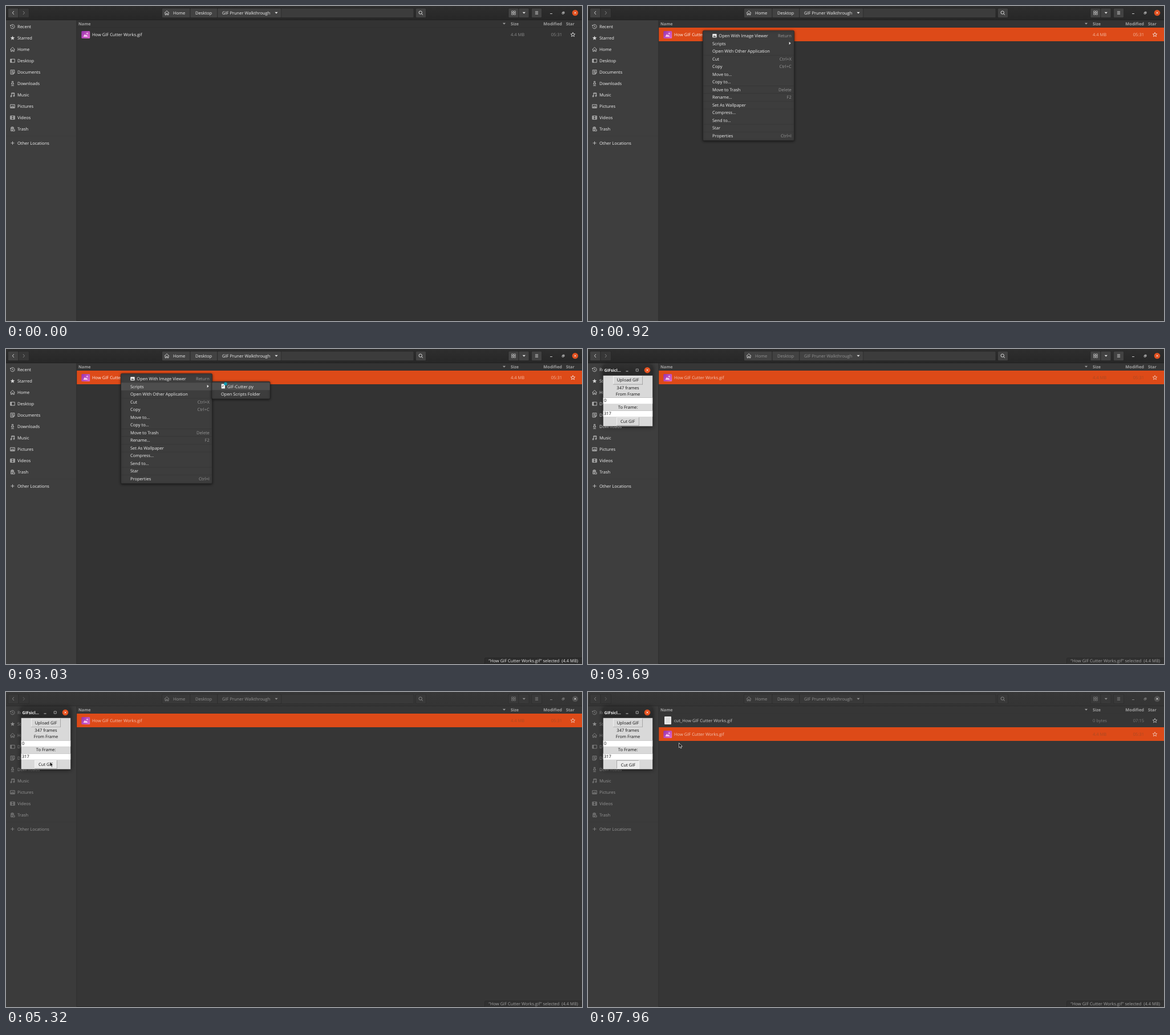
Recreate the animation shown at these times as an HTML page with a canvas. Size 1010x554 px, loop 8 s.

```html
<!DOCTYPE html>
<html lang="en">
<head>
<meta charset="utf-8">
<title>File manager</title>
<style>
html, body { margin: 0; width: 100%; height: 100%; overflow: hidden; background: #333; }
canvas { display: block; }
</style>
</head>
<body>
<canvas id="stage" width="1010" height="554"></canvas>
<script>
const ctx = document.getElementById('stage').getContext('2d');
const LOOP = 8000;
const ORANGE = '#dd4a18';
const FONT = '"Open Sans", "Noto Sans", sans-serif';
const FILE = 'How GIF Cutter Works.gif';

const clamp = v => Math.max(0, Math.min(1, v));
const ramp = (t, from, to) => clamp((t - from) / (to - from));
const grey = (a, b = a, k = 0) => {
  const v = Math.round(a + (b - a) * k);
  return `rgb(${v},${v},${v})`;
};

function box(x, y, w, h, fill, border, radius = 0) {
  ctx.beginPath();
  ctx.roundRect(x, y, w, h, radius);
  if (fill) { ctx.fillStyle = fill; ctx.fill(); }
  if (border) { ctx.strokeStyle = border; ctx.lineWidth = 0.6; ctx.stroke(); }
}

// The y value is the middle of the capital letters.
function label(str, x, y, color, align = 'left', weight = 400, size = 7.53) {
  ctx.font = `${weight} ${size}px ${FONT}`;
  ctx.textAlign = align;
  ctx.fillStyle = color;
  ctx.fillText(str, x, y + 2.7);
}

function shape(d, x, y, { fill, stroke, width = 0.8 }) {
  ctx.save();
  ctx.translate(x, y);
  const path = new Path2D(d);
  if (fill) { ctx.fillStyle = fill; ctx.fill(path); }
  if (stroke) { ctx.strokeStyle = stroke; ctx.lineWidth = width; ctx.stroke(path); }
  ctx.restore();
}

function disc(x, y, r, fill) {
  ctx.beginPath();
  ctx.arc(x, y, r, 0, 7);
  ctx.fillStyle = fill;
  ctx.fill();
}

function withShadow(blur, draw) {
  ctx.save();
  ctx.shadowColor = 'rgba(0,0,0,.6)';
  ctx.shadowBlur = blur;
  ctx.shadowOffsetY = 1;
  draw();
  ctx.restore();
}

const STAR = 'M0-3.8L1.1-1.2 3.8-1.1 1.7.7 2.4 3.4 0 1.9-2.4 3.4-1.7.7-3.8-1.1-1.1-1.2Z';
const HOUSE = 'M-4 .3L0-3.7 4 .3M-2.9-.5V3.6H-.9V1H.9V3.6H2.9V-.5';
const CROSS = 'M-1.7-1.7L1.7 1.7M1.7-1.7L-1.7 1.7';
const DOWN = 'M-2.6-1.2H2.6L0 1.6Z';
const ARROW = 'M0 0V8.4L1.9 6.7 3.1 9.5 4.5 8.9 3.3 6.2H5.8Z';

const PLACES = [
  ['Recent', 'M-3.4-1.4A3.6 3.6 0 1 1-3.5.8M-3.9-3V-1.2H-2M0-2V.3L1.6 1.2'],
  ['Starred', STAR],
  ['Home', HOUSE],
  ['Desktop', 'M-3.8-2.9H3.8V2.9H-3.8ZM-2.7-2.9V2.9M-2-2.9V2.9'],
  ['Documents', 'M-3.4-3.7H3.4V1.4L1.2 3.7H-3.4ZM-1.9-1.8H1.9M-1.9 0H1.9M-1.9 1.7H.3M1.2 3.7V1.4H3.4'],
  ['Downloads', 'M-1-3.7H1V.2H2.5L0 2.6-2.5.2H-1ZM-2.5 3.7H2.5'],
  ['Music', 'M-1.7 2.4V-3.4H3.2V1.6M-1.7-2.3H3.2M-3.4 2.4A.9.9 0 1 0-1.7 2.4A.9.9 0 1 0-3.4 2.4M1.5 1.7A.9.9 0 1 0 3.2 1.7A.9.9 0 1 0 1.5 1.7'],
  ['Pictures', 'M-3.8-3H3.8V3H-3.8ZM-2.8 2L-.8-.5.5 1 1.5.1 2.8 2ZM1-1.5H2'],
  ['Videos', 'M-3.8-3H3.8V3H-3.8ZM-2.1-3V3M2.1-3V3M-2.1 0H2.1M-3.8-1H-2.1M-3.8 1H-2.1M2.1-1H3.8M2.1 1H3.8'],
  ['Trash', 'M-3.6-2.2H2.7M-1.8-2.2V-3.5H1V-2.2M-2.8-.8H2.6M-2.8-.8V3.5H-.5M0 1H3.6V3.6H0ZM-1.4.5V2.4']
];

const MENU = [
  ['Open With Image Viewer', 'Return'], ['Scripts'], ['Open With Other Application'],
  ['Cut', 'Ctrl+X'], ['Copy', 'Ctrl+C'], ['Move to…'], ['Copy to…'],
  ['Move to Trash', 'Delete'], ['Rename…', 'F2'], ['Set As Wallpaper'],
  ['Compress…'], ['Send to…'], ['Star'], ['Properties', 'Ctrl+I']
];
const SEPARATED = [2, 6, 7, 8, 9, 11, 12];

function drawHeader(textDim, dim) {
  const bg = ctx.createLinearGradient(0, 0, 0, 25);
  bg.addColorStop(0, grey(46, 55, dim));
  bg.addColorStop(1, grey(39, 52, dim));
  box(0, 0, 1010, 25, bg);
  box(0, 24.3, 1010, 0.7, grey(31, 43, dim));

  const edge = grey(36, 45, dim), face = grey(66, 57, dim);
  const ink = grey(235, 145, dim), text = grey(238, 145, textDim);
  const button = (x, w, fill = face) => box(x, 4, w, 16.5, fill, edge, 1.5);
  button(3.5, 18.5);
  button(22, 18.5, grey(55, 54, dim));
  shape('M1.4-3L-1.2 0 1.4 3', 12.5, 12, { stroke: ink });
  shape('M-1.4-3L1.2 0-1.4 3', 31.3, 12, { stroke: grey(145, 105, dim) });

  button(273.5, 441.5, grey(60, 57, dim));
  button(273.5, 49.5);
  button(323, 47.7);
  button(370.7, 112);
  shape(HOUSE, 282, 12, { stroke: ink });
  label('Home', 293, 12, text);
  label('Desktop', 332, 12, text);
  label('GIF Pruner Walkthrough', 379, 12, text);
  shape(DOWN, 474, 12, { fill: ink });

  button(718.5, 18);
  ctx.beginPath();
  ctx.arc(726.7, 11.5, 2.7, 0, 7);
  ctx.strokeStyle = ink;
  ctx.lineWidth = 0.9;
  ctx.stroke();
  shape('M0 0L2.2 2.2', 728.7, 13.5, { stroke: ink, width: 1 });

  button(881, 18);
  button(899, 18);
  button(921.5, 18);
  for (const x of [886.6, 890.6])
    for (const y of [8.8, 12.6]) box(x, y, 2.7, 2.7, null, ink);
  shape(DOWN, 908.3, 12, { fill: ink });
  shape('M-2.6-2.2H2.6M-2.6 0H2.6M-2.6 2.2H2.6', 930.5, 12, { stroke: ink });
  shape('M-2 0H2', 956, 13.5, { stroke: ink });
  shape('M-1.8-.5H.8V2H-1.8ZM-.7-.5V-1.7H2V.9H.8', 977, 12, { stroke: ink, width: 0.7 });
  disc(998, 12, 5.3, dim < 0.5 ? '#e0501f' : '#505050');
  shape(CROSS, 998, 12, { stroke: '#f4f4f4' });
}

function drawSidebar(dim) {
  box(0, 25, 124, 529, grey(62, 59, dim));
  box(123.4, 25, 0.8, 529, grey(42, 46, dim));
  const text = grey(242, 148, dim), ink = grey(212, 140, dim);
  PLACES.forEach(([name, icon], i) => {
    const y = 36.3 + i * 20;
    shape(icon, 11.5, y, name === 'Starred' ? { fill: ink } : { stroke: ink });
    label(name, 20, y, text);
  });
  box(0, 228, 123, 0.6, grey(57, 55, dim));
  shape('M-3 0H3M0-3V3', 11.5, 241, { stroke: ink });
  label('Other Locations', 20, 241, text);
}

function drawImageIcon(y) {
  const fill = ctx.createLinearGradient(132, y - 6, 147, y + 6);
  fill.addColorStop(0, '#9432ab');
  fill.addColorStop(1, '#df68cf');
  box(132.3, y - 6, 14.9, 13, fill, null, 1.5);
  shape('M-4 4L-1.3-.6.5 1.7 1.7.6 4 4Z', 139.5, y, { fill: '#f6cdf0' });
  shape('M0-2L.6-.6 2 0 .6.6 0 2-.6.6-2 0-.6-.6Z', 142.3, y - 1.7, { fill: '#f6cdf0' });
}

function drawRow(y, name, size, time, nameColor, infoColor, starColor) {
  label(name, 151, y, nameColor);
  label(size, 885, y, infoColor);
  label(time, 975, y, infoColor, 'right');
  shape(STAR, 994, y + 0.3, { stroke: starColor });
}

function drawList(t, dim) {
  box(124, 25, 886, 529, grey(51, 54, dim));
  const head = grey(160);
  label('Name', 127, 31, head, 'left', 700, 7.2);
  label('Size', 885, 31, head, 'left', 700, 7.2);
  label('Modified', 975, 31, head, 'right', 700, 7.4);
  label('Star', 982, 31, head, 'left', 700, 7.2);
  shape(DOWN, 873.5, 31, { fill: head });
  box(124, 37.4, 886, 0.6, grey(47, 50, dim));

  const cutDone = t >= 6130, selected = t >= 920;
  const y = cutDone ? 74 : 50;
  if (selected) box(124, y - 12, 886, 24, ORANGE);
  else if (t >= 260) box(124, y - 12, 886, 24, grey(63));
  drawImageIcon(y);
  const nameColor = !selected ? '#f2f2f2' : dim > 0.5 ? '#f2c4b3' : '#fff3ee';
  const infoColor = !selected ? '#8b8b8b' : t >= 3100 ? '#a94a24' : '#f4b9a0';
  drawRow(y, FILE, '4.4 MB', '05:31', nameColor, infoColor, dim > 0.5 ? '#f2d4c8' : '#f5f5f5');

  if (cutDone) {
    box(134, 43, 12, 14, '#e6e6e6', null, 1);
    shape('M-3-3H3M-3-1H3M-3 1H3M-3 3H3', 140, 50, { stroke: '#c8c8c8', width: 0.6 });
    drawRow(50, 'cut_' + FILE, '0 bytes', '07:15', '#c9c9c9', '#7b7b7b', '#c9c9c9');
  }
  box(0, 553.2, 1010, 0.8, grey(40));
}

function drawStatus(t, dim) {
  ctx.globalAlpha = ramp(t, 1100, 1280);
  box(839.5, 543.3, 172, 12, grey(45, 49, dim), grey(33, 40, dim), 1.5);
  label(`“${FILE}” selected  (4.4 MB)`, 1003, 548.5, grey(236, 160, dim), 'right');
  ctx.globalAlpha = 1;
}

function drawMenu(t) {
  const face = grey(61), hover = grey(78), text = grey(240);
  const rowY = i => 52.4 + i * 13.53;
  const panel = (x, y, w, h) => withShadow(4, () => box(x, y, w, h, face, grey(35), 2));

  panel(201.5, 43.2, 160, 193.5);
  const over = t >= 1940 ? 1 : t >= 1600 ? 2 : t >= 1530 ? 1 : t >= 1460 ? 0 : -1;
  if (over >= 0) box(202, rowY(over) - 6.7, 159, 13.4, hover);
  MENU.forEach(([name, key], i) => {
    const y = rowY(i);
    label(name, i ? 218 : 229.3, y, text);
    if (key) label(key, 356.8, y, grey(150), 'right');
    if (SEPARATED.includes(i)) box(202, y + 6.5, 159, 0.6, grey(51));
  });
  box(218.2, 49, 7.5, 6.6, '#e8e8e8', null, 1);
  shape('M-2.5 1.8L-.8-.8.5.8 1.4 0 2.6 1.8Z', 222, 52.4, { fill: '#444' });
  shape('M-1.3-2.5V2.5L1.6 0Z', 354, 65.6, { fill: text });

  if (t < 2180) return;
  panel(361, 57.3, 102, 30.5);
  if (t >= 2500) box(361.5, 59.2, 101, 13, hover);
  box(377.7, 61.6, 6.3, 7.8, '#f4f4f4', null, 0.6);
  shape('M-1.3 1.2V-.8H1', 381, 65.6, { stroke: '#444' });
  disc(385, 61.3, 2.8, '#129db3');
  label('GIF-Cutter.py', 388, 65.8, text);
  label('Open Scripts Folder', 377, 79.4, text);
}

function reliefButton(x, y, w, h, face, sunken) {
  const light = '#fafafa', dark = '#929292';
  box(x, y, w, h, face);
  box(x, y, w, 0.7, sunken ? dark : light);
  box(x, y, 0.7, h, sunken ? dark : light);
  box(x, y + h - 0.7, w, 0.7, sunken ? light : dark);
  box(x + w - 0.7, y, 0.7, h, sunken ? light : dark);
}

function drawDialog(t) {
  // Grows upward from its bottom edge.
  const k = ramp(t, 3530, 3780);
  const grow = k === 1 ? 1 : 1 - 2 ** (-10 * k) * 0.99;
  ctx.save();
  ctx.translate(0, 136 * (1 - grow));
  ctx.scale(1, grow);

  const bar = ctx.createLinearGradient(0, 26, 0, 46);
  bar.addColorStop(0, '#303030');
  bar.addColorStop(1, '#262626');
  withShadow(9, () => box(26.3, 26, 87.2, 110, bar, null, [4, 4, 0, 0]));
  label('GIFsicl...', 28.5, 36, '#f4f4f4', 'left', 700, 7.2);
  shape('M-2 0H2', 68.5, 38, { stroke: '#eee' });
  box(84.2, 34, 4, 4, null, '#eee');
  disc(104, 36, 5.3, '#e5511f');
  shape(CROSS, 104, 36, { stroke: '#fff' });

  box(26.7, 45.8, 86.5, 90, '#d9d9d9');
  const ink = '#111';
  reliefButton(44, 46.8, 52, 14.8, '#d9d9d9');
  label('Upload GIF', 70, 53.8, ink, 'center');
  label('347 frames', 70, 67.4, ink, 'center');
  label('From Frame', 70, 78.3, ink, 'center');
  label('To Frame:', 70, 101.5, ink, 'center');
  for (const [value, y] of [['0', 90.3], ['317', 113.3]]) {
    box(26.7, y - 5.4, 86.5, 10.8, '#fff');
    box(26.7, y - 5.4, 86.5, 0.6, '#999');
    label(value, 28, y, ink);
  }
  const pressed = t >= 5830, shift = pressed ? 0.6 : 0;
  reliefButton(50.2, 120, 39.4, 15, t >= 5260 ? '#ececec' : '#d9d9d9', pressed);
  label('Cut GIF', 69.8 + shift, 127.4 + shift, ink, 'center');
  ctx.restore();
}

// Pointer positions: time, x, y.
const TRAIL = [
  [4430, 126, 81], [4650, 104, 87], [4900, 74, 96], [5050, 64, 104], [5200, 72, 113],
  [5320, 77, 122.7], [6920, 77, 122.7], [7260, 104, 129.5], [7670, 104, 129.5], [7960, 159.5, 89.5], [LOOP, 159.5, 89.5]
];

function drawPointer(t) {
  const i = TRAIL.findIndex(p => p[0] > t);
  if (i < 1) return;
  const [t0, x0, y0] = TRAIL[i - 1], [t1, x1, y1] = TRAIL[i];
  const k = ramp(t, t0, t1);
  const x = x0 + (x1 - x0) * k, y = y0 + (y1 - y0) * k;
  if (t >= 6130 && t < 6330) {
    const turn = t / 90;
    ctx.lineWidth = 1.3;
    for (const [color, from, to] of [['#b9d9e2', 0, 6.3], ['#5fb4cd', turn, turn + 3.5]]) {
      ctx.beginPath();
      ctx.arc(x, y + 1, 5.3, from, to);
      ctx.strokeStyle = color;
      ctx.stroke();
    }
  }
  shape(ARROW, x, y, { fill: '#111', stroke: '#f2f2f2', width: 0.7 });
}

function draw(t) {
  ctx.textRendering = 'geometricPrecision';
  const listDim = ramp(t, 3500, 3660), dim = ramp(t, 3690, 3930);
  drawList(t, listDim);
  drawSidebar(dim);
  drawHeader(listDim, dim);
  if (t >= 1100) drawStatus(t, listDim);
  if (t >= 920 && t < 3100) drawMenu(t);
  if (t >= 3530) drawDialog(t);
  drawPointer(t);
}

function tick() {
  draw(performance.now() % LOOP);
  requestAnimationFrame(tick);
}
tick();
</script>
</body>
</html>
```
